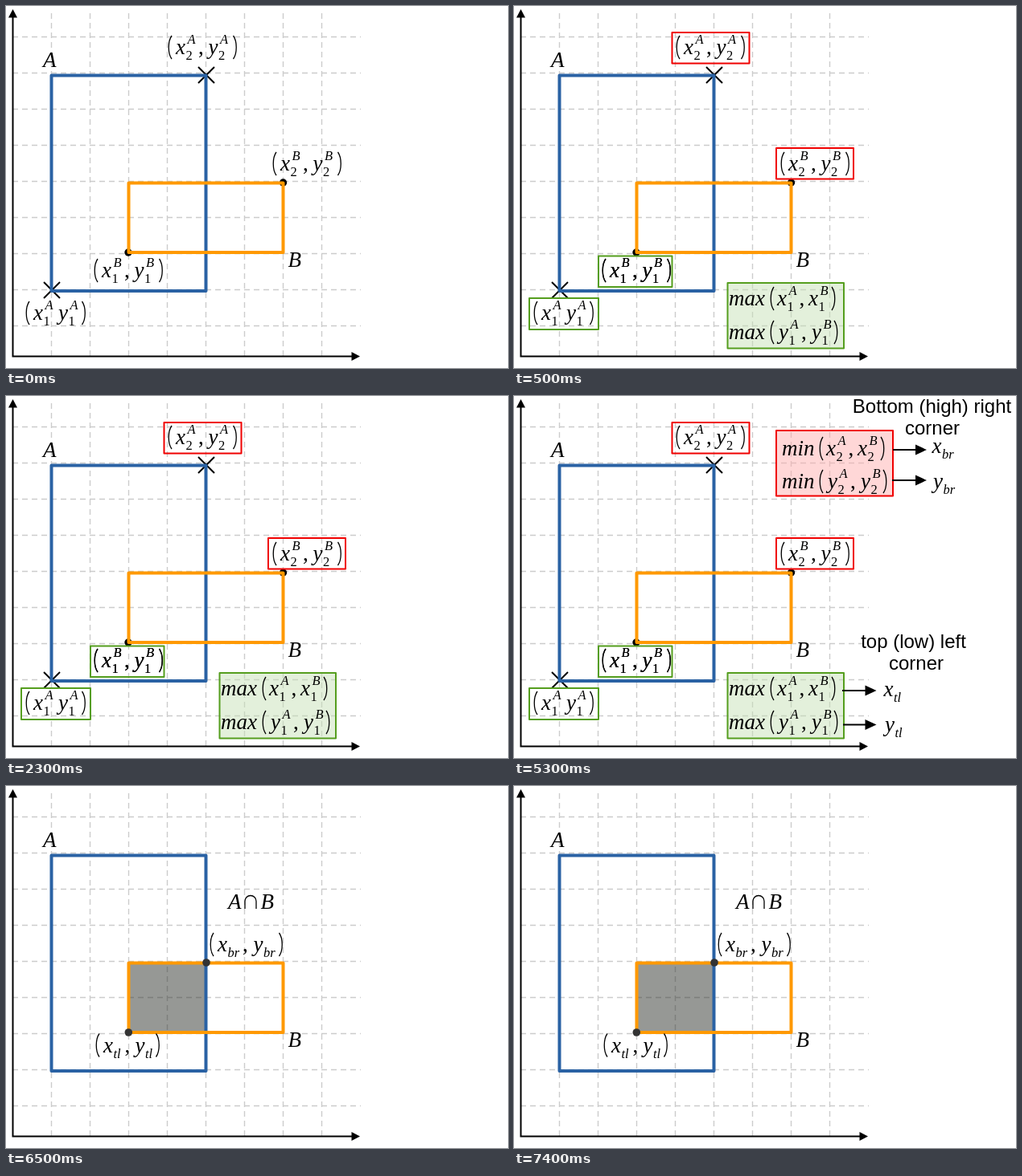
Write an HTML page that moves like this. It is 624x451 px and loops after 8000 ms.

```html
<!DOCTYPE html>
<html lang="en">
<head>
<meta charset="utf-8">
<title>Rectangle intersection</title>
<style>
html, body { margin: 0; width: 100%; height: 100%; overflow: hidden; background: #fff; }
svg { display: block; }
text { font: 27px "Liberation Serif", serif; }
.i { font-style: italic; }
.s { font-size: 16.5px; }
.sans { font: 24px "Liberation Sans", Arial, sans-serif; text-anchor: middle; }
.line { fill: none; stroke: #000; stroke-width: 2; }
.paren { fill: none; stroke: #000; stroke-width: 1.3; }
</style>
</head>
<body>
<svg id="stage" width="624" height="451" viewBox="0 0 624 451"></svg>
<script>
const RED = '#f00000', GREEN = '#559e1e';
const text = (x, y, s, cls = 'i') => `<text x="${x}" y="${y}" class="${cls}">${s}</text>`;
const path = (d, attrs = 'class="line"') => `<path d="${d}" ${attrs}/>`;
const dot = (x, y, r, fill) => `<circle cx="${x}" cy="${y}" r="${r}" fill="${fill}"/>`;
const cross = (x, y) => path(`M${x - 10} ${y - 10}l20 20m0-20l-20 20`);
const box = (x, y, x2, y2, stroke, width = 2, fill = 'none') =>
  `<rect x="${x}" y="${y}" width="${x2 - x}" height="${y2 - y}" stroke="${stroke}" stroke-width="${width}" fill="${fill}" stroke-linejoin="round"/>`;
const paren = (x, y, dir) => path(`M${x} ${y - 23}c${-5 * dir} 7 ${-5 * dir} 22 0 29`, 'class="paren"');
const arrow = (x, y, tip) => path(`M${x} ${y}H${tip - 10}`) + path(`M${tip} ${y}l-14-6.5v13z`, '');

// A variable is [letter, subscript, superscript]; without superscript the subscript is italic.
const variable = (x, y, [letter, sub, sup]) => text(x, y, letter) +
  text(x + 12.5, y + 7, sub, sup ? 's' : 'i s') + (sup ? text(x + 14.5, y - 13, sup, 'i s') : '');

// Offsets from x: first variable, comma (0 for none), second variable, closing bracket.
const pair = (x, y, a, b, [first, comma, second, close]) =>
  paren(x + 5, y, 1) + variable(x + first, y, a) + (comma ? text(x + comma, y, ',', '') : '') +
  variable(x + second, y, b) + paren(x + close, y, -1);

const corner = (x, y, n, name, gaps = [10, 38, 50.5, 81.5]) =>
  pair(x, y, ['x', n, name], ['y', n, name], gaps);
const call = (x, y, fn, v, n, width, gaps) =>
  text(x, y, fn) + pair(x + width, y, [v, n, 'A'], [v, n, 'B'], gaps);
const X_GAPS = [9, 36.5, 48, 77], Y_GAPS = [11, 39, 52, 80];

let grid = '';
for (let x = 56.5; x < 400; x += 48) grid += `M${x} 436V4`;
for (let y = 38.5; y < 400; y += 45) grid += `M8 ${y}H441`;

const cornerB1 = corner(109, 338, 1, 'B');

const layers = [
  // [visible from, visible until, markup]
  [0, 8000, path(grid, 'stroke="#ccc" stroke-width="1.4" stroke-dasharray="7 5" fill="none"') +
    path('M8.5 10V436.5H434') + path('M8.5 4l-5.5 10.5h11zM440 436.5l-10.5-5.5v11z', '')],
  [0, 6500, cross(249, 86) + cross(57, 354) + dot(344.5, 220, 4.7, '#000') + dot(152, 307, 4.7, '#000')],
  [6500, 8000, '<path d="M152.5 220.5h96v86.5h-96z" fill="#2f332c" fill-opacity=".5"/>'],
  [0, 8000, box(56.5, 86.5, 248.5, 355, '#2a62a4', 4) + box(152.5, 220.5, 344.5, 307, '#ff9900', 4) +
    text(46, 76, 'A') + text(350.5, 325, 'B')],
  [0, 6500, corner(201, 60, 2, 'A') + corner(331, 205, 2, 'B') + cornerB1 +
    corner(24, 391, 1, 'A', [10, 0, 41, 70.5])],
  [500, 6500, box(196.5, 33, 292.5, 71.5, RED) + box(326, 177, 422, 215.5, RED) +
    box(105, 311.5, 196.5, 350, GREEN) + box(19, 364, 105, 403, GREEN) + cornerB1 +
    box(265.5, 345, 410, 426.5, GREEN, 2, 'rgba(200,226,184,.5)') +
    call(267, 373, 'max', 'x', 1, 51, X_GAPS) + call(267, 415, 'max', 'y', 1, 51, Y_GAPS)],
  [3500, 6500, box(326, 43, 471, 124.5, RED, 2, 'rgba(255,176,176,.5)') +
    call(333, 74, 'min', 'x', 2, 46, X_GAPS) + call(333, 115, 'min', 'y', 2, 46, Y_GAPS) +
    arrow(471, 67, 513) + arrow(470, 105, 513) + arrow(408, 367, 450.5) + arrow(409, 409.5, 450.5) +
    variable(519.5, 71, ['x', 'br']) + variable(521, 115, ['y', 'br']) +
    variable(459.5, 374, ['x', 'tl']) + variable(461, 418, ['y', 'tl']) +
    text(519.5, 21, 'Bottom (high) right', 'sans') + text(520, 48, 'corner', 'sans') +
    text(496.5, 314, 'top (low) left', 'sans') + text(500, 341, 'corner', 'sans')],
  [6500, 8000, dot(249, 220, 4.8, '#333') + dot(152.3, 307, 4.8, '#333') +
    text(276, 153, 'A') + text(316.5, 153, 'B') +
    path('M297 153V143.5a7 7 0 0 1 14 0V153', 'class="paren"') +
    pair(253, 206, ['x', 'br'], ['y', 'br'], [10, 41, 54.5, 86.5]) +
    pair(111, 331.5, ['x', 'tl'], ['y', 'tl'], [10, 36.5, 49.5, 75.5])]
];

const stage = document.getElementById('stage');
stage.innerHTML = layers.map(layer => `<g>${layer[2]}</g>`).join('');
const groups = [...stage.children];

function draw(now) {
  const t = now % 8000;
  layers.forEach(([from, until], i) => {
    groups[i].style.display = t >= from && t < until ? '' : 'none';
  });
  requestAnimationFrame(draw);
}
draw(performance.now());
</script>
</body>
</html>
```
